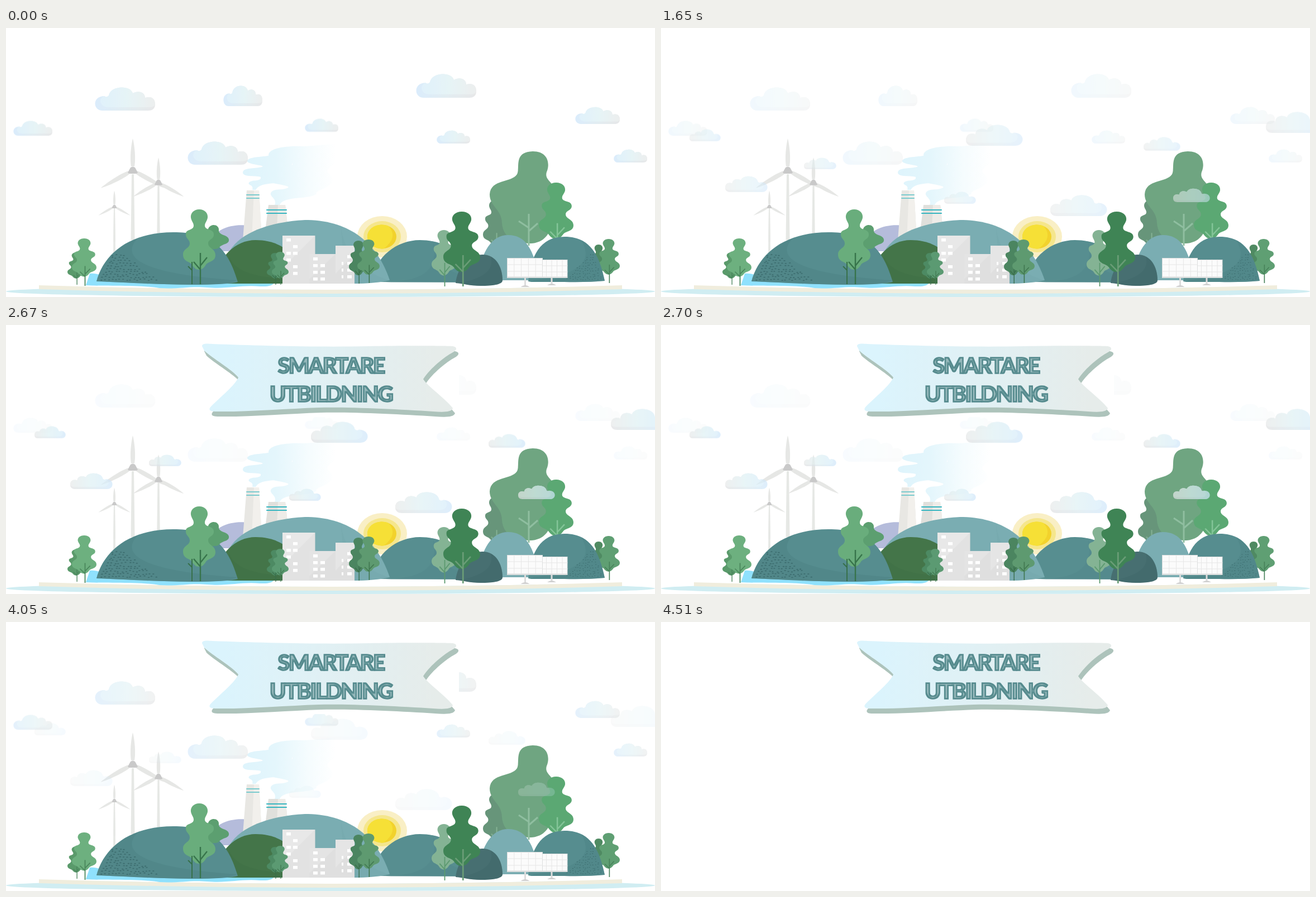
These frames come from a looping animation (1162x482 px, 7510 ms). An HTML page:

```html
<!DOCTYPE html>
<html lang="sv">
<head>
<meta charset="utf-8">
<title>Smartare utbildning</title>
<style>
html, body { margin: 0; width: 100%; height: 100%; overflow: hidden; background: #fff; }
svg { display: block; width: 100%; height: 100%; }
#words { font: 900 40px Lato, sans-serif; letter-spacing: -2.9px; text-anchor: middle; }
</style>
</head>
<body>
<svg viewBox="0 0 1162 482">
  <defs>
    <linearGradient id="cloudFill"><stop stop-color="#d7edfa"/><stop offset=".5" stop-color="#dff1f4"/><stop offset="1" stop-color="#e7e9e9"/></linearGradient>
    <linearGradient id="cloudShade"><stop stop-color="#d0e7fb"/><stop offset=".5" stop-color="#dae8ee"/><stop offset="1" stop-color="#e0e1e2"/></linearGradient>
    <linearGradient id="smokeFill" gradientUnits="userSpaceOnUse" x1="424" x2="590" y1="0" y2="0"><stop stop-color="#def4fc"/><stop offset=".35" stop-color="#e4f6fc"/><stop offset=".7" stop-color="#f5fcfe"/><stop offset="1" stop-color="#fff"/></linearGradient>
    <linearGradient id="bannerFill" gradientUnits="userSpaceOnUse" x1="390" x2="770" y1="0" y2="0"><stop stop-color="#dbf4fd"/><stop offset="1" stop-color="#e6ecea"/></linearGradient>
    <filter id="inline"><feMorphology operator="erode" radius="2"/></filter>
    <g id="cloud">
      <path fill="url(#cloudShade)" d="M14 41C-4 41-5 15 17 15C20 17 22 17 25 14C28-4 64-5 68 10C78 4 90 8 90 18C104 14 108 22 108 30C108 38 102 41 96 41Z"/>
      <path fill="url(#cloudFill)" d="M25 35C8 35 6 19 17 15C20 17 22 17 25 14C28-4 64-5 68 10C78 4 90 8 90 18C104 14 108 22 108 30C107 34 102 35 96 35Z"/>
    </g>
    <path id="leaves" d="M0 0C10 0 16 7 15 15C14 21 10 24 10 29C10 38 25 34 26 44C27 54 16 53 16 61C16 70 29 70 29 82C29 94 16 93 12 99C8 106 4 108-1 108C-6 108-9 105-13 99C-17 93-29 94-29 81C-29 70-17 70-17 61C-17 53-25 53-24 43C-23 35-10 38-10 29C-10 24-14 21-15 15C-16 7-10 0 0 0Z"/>
    <path id="trunk" fill="none" stroke-width="2.4" d="M2 78V134M2 108L-10 94M2 101L14 86"/>
    <g id="turbine">
      <path fill="#e6e8e5" d="M-2 7H2L3.5 125H-3.5Z"/>
      <g fill="#e6e7e5">
        <path id="blade" d="M0-57C2-50 6-25 3-7H-3C-6-25-2-50 0-57Z"/>
        <use href="#blade" transform="rotate(119) scale(1 1.15)"/>
        <use href="#blade" transform="rotate(-119) scale(1 1.15)"/>
      </g>
      <path fill="#c9c9c9" d="M-4-5Q0-8 4-5L9 4Q8 6 5 6H-5Q-8 6-9 4Z"/>
    </g>
    <path id="ribbon" d="M351 38C351 33 358 33 370 34C450 37 560 40 650 38C700 37 780 37 800 38C810 40 806 46 800 49C785 57 760 77 747 97C755 110 785 130 800 149C798 157 780 156 765 155C700 151 620 147 560 148C500 150 430 156 375 155C364 155 362 151 367 146C385 128 410 108 416 94C405 80 370 60 355 46Z"/>
    <g id="words"><text x="581.5" y="87">SMARTARE</text><text x="581.5" y="138">UTBILDNING</text></g>
  </defs>

  <g id="scene">
    <ellipse cx="581" cy="472" rx="581" ry="10" fill="#d0edf2"/>
    <path fill="#fff" d="M59 461Q320 469 581 469T1103 461Z"/>
    <path fill="#f0eddd" d="M59 461Q320 469 581 469T1103 461V468Q842 476 581 476T59 468Z"/>
    <path fill="#8fe1fd" d="M150 440C160 438 175 445 180 445L480 456Q478 464 455 463C420 460 400 468 360 465C330 462 310 468 275 466C240 460 180 463 143 461Z"/>
    <path fill="#b5bcdb" d="M360 400C365 350 425 350 440 356V400Z"/>
    <use href="#turbine" transform="translate(194 320) scale(.5)"/>
    <path fill="#e6e8e5" d="M193 323h2l1 82h-4Z"/>
    <use href="#turbine" transform="translate(227 255)"/>
    <use href="#turbine" transform="translate(273 277) scale(.79)"/>

    <g fill="url(#smokeFill)">
      <path d="M441 290C444 280 432 282 435 277C440 271 458 276 456 267C450 264 424 268 424 259C424 250 445 252 458 249C468 246 430 245 432 238C434 229 470 232 478 226C500 226 516 238 512 245C516 266 505 274 495 276C470 280 455 278 447 290Z"/>
      <path d="M481 317C486 306 472 303 474 296C478 286 495 292 505 286C512 280 455 280 456 265C456 250 500 252 513 245C518 236 470 242 470 227C472 215 500 211 530 212C560 211 600 205 610 208C615 240 560 250 580 262C600 285 550 290 556 297C545 308 497 300 490 317Z"/>
    </g>
    <path fill="#e8e7e3" d="M431 291H453L458 380H424Z"/><path fill="#f2f0ec" d="M444 291H453L458 380H440Z"/>
    <path stroke="#7ccbce" stroke-width="2" stroke-linecap="round" d="M431 299H453M431 305H453"/>
    <path fill="#e0e0dc" d="M470 317H500L507 380H462Z"/><path fill="#eeece8" d="M487 317H500L507 380H484Z"/>
    <path stroke="#38b6c0" stroke-width="2.2" stroke-linecap="round" d="M467 326H502M467 332H502"/>

    <g id="sun">
      <ellipse cx="673.5" cy="374" rx="44.5" ry="37" fill="#f9efc5"/>
      <ellipse cx="673.5" cy="374" rx="33.5" ry="28" fill="#f5e68c"/>
      <ellipse cx="673" cy="374" rx="26" ry="21.5" fill="#f2d22c"/>
      <path fill="#f6e036" d="M685 355C697 368 694 382 676 395.500C660 396 647 387 647 374C647 357 668 348 685 355Z"/>
    </g>
    <path fill="#578e90" d="M655 455C660 410 700 380 741 380C800 380 830 420 860 456Z"/>
    <path fill="#4d8385" opacity=".3" d="M765 383C765 420 790 440 845 450L860 456H680C710 452 780 455 765 383Z"/>
    <path fill="#7aadb2" d="M400 400C430 350 520 344 541 344C616 346 665 385 687 452Q660 458 620 458H400Z"/>
    <path fill="#6b9fa5" opacity=".25" d="M600 355C602 400 640 440 687 452Q660 458 620 458H560C620 440 600 390 600 355Z"/>
    <path fill="#447549" d="M370 458C380 410 410 380 447 380C480 380 497 393 505 400V458Z"/>
    <path fill="#3d6d44" opacity=".35" d="M400 410C410 440 460 448 505 449V458H395Z"/>
    <path fill="#568d8f" d="M162 454C175 405 220 366 300 366C360 366 395 385 415 455Q400 460 330 460C270 460 200 455 162 454Z"/>
    <path fill="#4c8284" opacity=".5" d="M236 377C208 405 225 440 414 452Q400 460 330 460C270 460 200 455 162 454C172 420 195 392 236 377Z"/>

    <g id="backTrees"></g>
    <path fill="#6fa581" d="M943 221C972 221 974 245 968 258C963 275 985 275 983 300C982 340 980 384 940 386C915 386 890 378 888 350C888 325 866 320 866 298C868 270 905 278 915 262C921 250 908 222 943 221Z"/>
    <path stroke="#8fbea0" stroke-width="3" fill="none" d="M936 333V390M936 358L918 346M936 364L952 350"/>
    <g id="rightTrees"></g>
    <path fill="#7aadb2" d="M845 452C850 400 870 371 899 371C930 371 945 395 955 452Z"/>
    <path fill="#568d8f" d="M935 454C940 410 955 374 1000 374C1045 374 1062 405 1072 453Q1040 456 1000 455H940Z"/>
    <path fill="#4c8284" opacity=".45" d="M1030 380C1050 415 1035 440 945 452L940 455H1000Q1040 456 1072 453C1064 415 1052 392 1030 380Z"/>
    <path fill="#476f71" d="M805 457C810 420 835 406 853 406C878 406 889 430 889 452C889 460 870 462 850 462C830 462 820 458 805 457Z"/>
    <path fill="#3d6467" opacity=".4" d="M868 410C876 435 850 450 812 457C825 459 830 462 850 462C870 462 889 460 889 452C889 432 881 415 868 410Z"/>
    <g id="dots" fill="#3d6d6f"></g>

    <path fill="#e2e2e2" d="M495 372H553.500V458H495Z"/><path fill="#e8e8e8" d="M495 372H553L495 430Z"/>
    <path fill="#e5e5e5" d="M590 390H624V458H590Z"/><path fill="#dfdfdf" d="M624 405V458H590V440Z"/>
    <path fill="#dfdfdf" d="M543 405H590V458H543Z"/><path fill="#e4e4e4" d="M543 405H590L543 450Z"/>
    <g id="windows" fill="#fff"></g>
    <path fill="#5c9f70" d="M362 360C366 349 382 352 381 362C380 372 398 370 399 379C400 388 388 386 382 393C376 399 360 396 355 390Z"/>
    <g id="frontTrees"></g>
    <g id="panels"></g>
    <g id="blueClouds"></g>
    <g id="greyClouds"></g>
  </g>

  <g id="banner">
    <path fill="#fff" d="M351 33H811V165H351Z"/>
    <use href="#ribbon" x="4" y="9" fill="#adc3bb"/>
    <use href="#ribbon" fill="url(#bannerFill)"/>
    <use href="#words" fill="#568b8e" stroke="#568b8e" stroke-width="1.4"/>
    <g filter="url(#inline)" opacity=".5"><use href="#words" fill="#d4e6e8"/></g>
  </g>
</svg>
<script>
const byId = id => document.getElementById(id);
const add = (id, markup) => byId(id).insertAdjacentHTML('beforeend', markup);
const rect = (x, y, w, h, fill) =>
  `<rect x="${x}" y="${y}" width="${w}" height="${h}"${fill ? ` fill="${fill}"` : ''}/>`;

function tree(id, x, top, bottom, width, leaves, trunk) {
  add(id, `<g transform="translate(${x} ${top}) scale(${width / 58} ${(bottom - top) / 134})">
    <use href="#leaves" fill="${leaves}"/><use href="#trunk" stroke="${trunk}"/></g>`);
}
tree('backTrees', 877, 308, 410, 46, '#67957a', '#86b295');
tree('backTrees', 1061, 388, 452, 28, '#4f8a62', '#417751');
tree('backTrees', 1079, 378, 457, 40, '#5f9f73', '#47825a');
tree('rightTrees', 985, 277, 402, 62, '#5ba873', '#84c498');
tree('frontTrees', 126, 402, 460, 32, '#5a9a6b', '#47825a');
tree('frontTrees', 140, 377, 462, 44, '#6db07f', '#4a875c');
tree('frontTrees', 346, 325, 459, 58, '#69ad7c', '#37744b');
add('frontTrees', '<path stroke="#37704a" stroke-width="2" fill="none" d="M333 419V459M333 434L326 427"/>');
tree('frontTrees', 482, 403, 460, 30, '#4d8a63', '#396e4b');
tree('frontTrees', 491, 401, 460, 30, '#5b9a72', '#417851');
tree('frontTrees', 631, 381, 458, 34, '#4b8560', '#396e4b');
tree('frontTrees', 649, 379, 457, 40, '#5e9a70', '#417851');
tree('frontTrees', 784, 362, 463, 44, '#84b394', '#5d9a70');
tree('frontTrees', 816, 329, 463, 66, '#3f8455', '#6a9d77');

let seed = 7;
const random = () => (seed = seed * 16807 % 2147483647) / 2147483647;
function speckle(y, left, right, step, size) {
  for (let x = left; x <= right; x += step)
    add('dots', `<ellipse cx="${x + random() * 3 - 1.5}" cy="${y + random() * 3 - 1.5}" rx="${size}" ry="${size * .5}"/>`);
}
for (let row = 0; row < 10; row++) {
  speckle(407 + row * 4.9, 192 - row * 2.4, 212 + row * 6.5, 6.5, 1.8);
  speckle(406 + row * 4.9, 1046 - row * 4.5, 1051 + row * 1.7, 4.5, 1.1);
}

const pane = (x, y, w = 8) => add('windows', rect(x, y, w, 5.5));
pane(502, 377); pane(514, 389);
pane(502, 401); pane(514, 401);
pane(502, 413); pane(514, 425); pane(514, 437);
pane(550, 411);
for (const y of [423, 435, 447]) {
  pane(550, y); pane(563, y);
  pane(601, y - 4, 3); pane(611, y - 4);
}
pane(611, 407);

function panel(x, y, w, h, columns, foot, ground) {
  let lines = '';
  for (let i = 1; i < columns; i++) lines += `M${x + i * w / columns} ${y}v${h - 2}`;
  for (let i = 1; i < 3; i++) lines += `M${x} ${y + i * h / 3}h${w}`;
  add('panels', rect(foot - 1.5, y + h, 3, ground - y - h, '#dcdcdc') +
    `<path fill="#cfcfcf" d="M${foot - 8} ${ground + 2}Q${foot} ${ground - 4} ${foot + 8} ${ground + 2}Z"/>` +
    rect(x, y, w, h, '#dcdede') + rect(x + 1, y + 1, w - 2, h - 3.5, '#fbfbfb') +
    `<path stroke="#e6e6e6" d="${lines}"/>`);
}
panel(958, 415, 47.5, 33, 5, 977, 459);
panel(897, 412, 64, 36, 5, 929.5, 462);

function cloud(id, x, y, w, h, flip) {
  add(id, `<use href="#cloud" transform="translate(${flip ? x + w : x} ${y}) scale(${(flip ? -w : w) / 108} ${h / 41})"/>`);
}
[[159, 107, 108, 41], [389, 104, 70, 36], [734, 83, 108, 42], [1019, 142, 80, 30], [13, 167, 70, 26],
 [535, 163, 60, 23], [771, 184, 60, 23], [1088, 218, 60, 23], [325, 204, 108, 41]]
  .forEach(box => cloud('blueClouds', ...box));
[[546, 174, 102, 37], [697, 300, 102, 37], [1083, 151, 102, 37], [51, 182, 56, 21], [115, 266, 76, 28],
 [256, 233, 58, 20], [507, 294, 57, 21], [864, 196, 66, 24], [917, 288, 66, 24]]
  .forEach(box => cloud('greyClouds', ...box, true));

const LOOP = 7510, BANNER_IN = 2610, SCENE_OUT = 4510, FADE = 5000;

function draw() {
  const t = performance.now() % LOOP;
  const mix = (1 - Math.cos(2 * Math.PI * t / FADE)) / 2;
  byId('blueClouds').setAttribute('opacity', .77 * (1 - .8 * mix));
  byId('greyClouds').setAttribute('opacity', .72 * mix);
  byId('scene').style.display = t < SCENE_OUT ? '' : 'none';
  byId('banner').style.display = t < BANNER_IN ? 'none' : '';
  requestAnimationFrame(draw);
}
draw();
</script>
</body>
</html>
```
